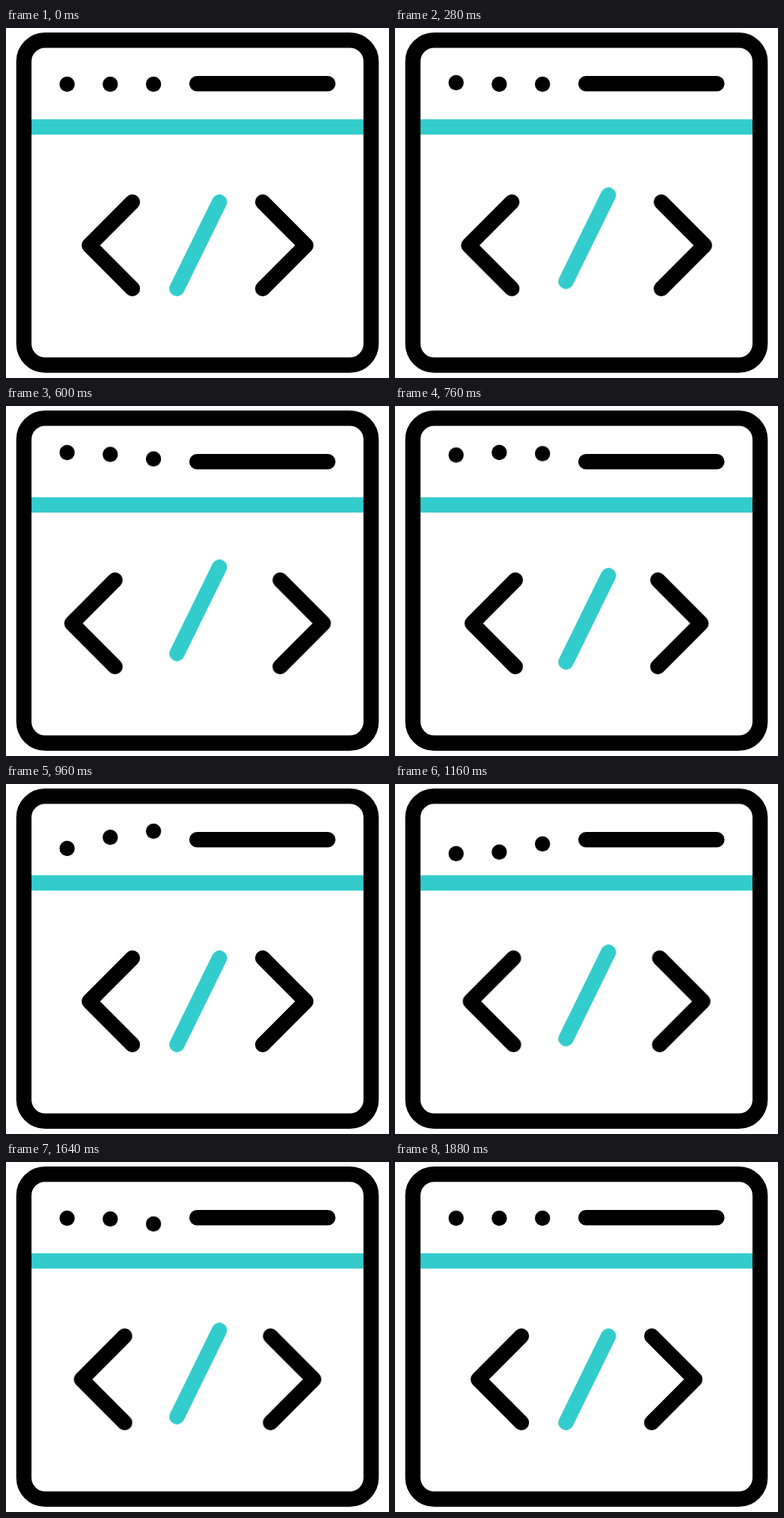
Write an HTML page without scripts that moves like this. It is 512 by 467 pixels and loops after 1920 ms.

```html
<!DOCTYPE html>
<html lang="en">
<head>
<meta charset="utf-8">
<title>Code window</title>
<style>
  html, body { margin: 0; width: 100%; height: 100%; overflow: hidden; background: #fff; }
  svg { display: block; width: 100vw; height: 100vh; }
  .line { fill: none; stroke: #000; stroke-width: 20.4; stroke-linecap: round; stroke-linejoin: round; }
  .teal { stroke: #33cccc; }
  .flat { stroke-linecap: butt; }

  .move { animation: 1920ms cubic-bezier(.5, 0, .5, 1) infinite; }
  .left { --x: -25.5px; animation-name: push; }
  .right { --x: 25.5px; animation-name: push; }
  .slash { --y: -19px; animation-name: push; }
  .dot1 { animation-name: bob1; }
  .dot2 { animation-name: bob2; }
  .dot3 { animation-name: bob3; }

  @keyframes push {
    0%, 3.18%, 48.96%, 50%, 95.9%, 100% { transform: none; }
    26.04%, 72.92% { transform: translate(var(--x, 0px), var(--y, 0px)); }
  }

  /* same wave, each dot a little later */
  @keyframes bob1 {
    0%, 6.93%, 83.33%, 100% { transform: none; }
    32.97% { transform: translateY(-13px); }
    59.2% { transform: translateY(18px); }
  }
  @keyframes bob2 {
    0%, 13.7%, 89.84%, 100% { transform: none; }
    39.9% { transform: translateY(-13px); }
    65.9% { transform: translateY(18px); }
  }
  @keyframes bob3 {
    0%, 20.47%, 96.6%, 100% { transform: none; }
    46.5% { transform: translateY(-13px); }
    72.4% { transform: translateY(18px); }
  }
</style>
</head>
<body>
<svg viewBox="0 0 512 467">
  <path class="line teal flat" d="M30 132H482"/>
  <rect class="line" x="23.9" y="16.2" width="464.2" height="433.6" rx="28.5"/>

  <circle class="move dot1" cx="81.7" cy="75" r="10.2"/>
  <circle class="move dot2" cx="139.4" cy="75" r="10.2"/>
  <circle class="move dot3" cx="197.2" cy="75" r="10.2"/>
  <path class="line" d="M255.2 74.2H430.3"/>

  <path class="line move left" d="M169 232.3L111.3 290L169 347.7"/>
  <path class="line teal move slash" d="M285.3 232.3L228.5 347.7"/>
  <path class="line move right" d="M343.2 232.3L400.9 290L343.2 347.7"/>
</svg>
</body>
</html>
```
